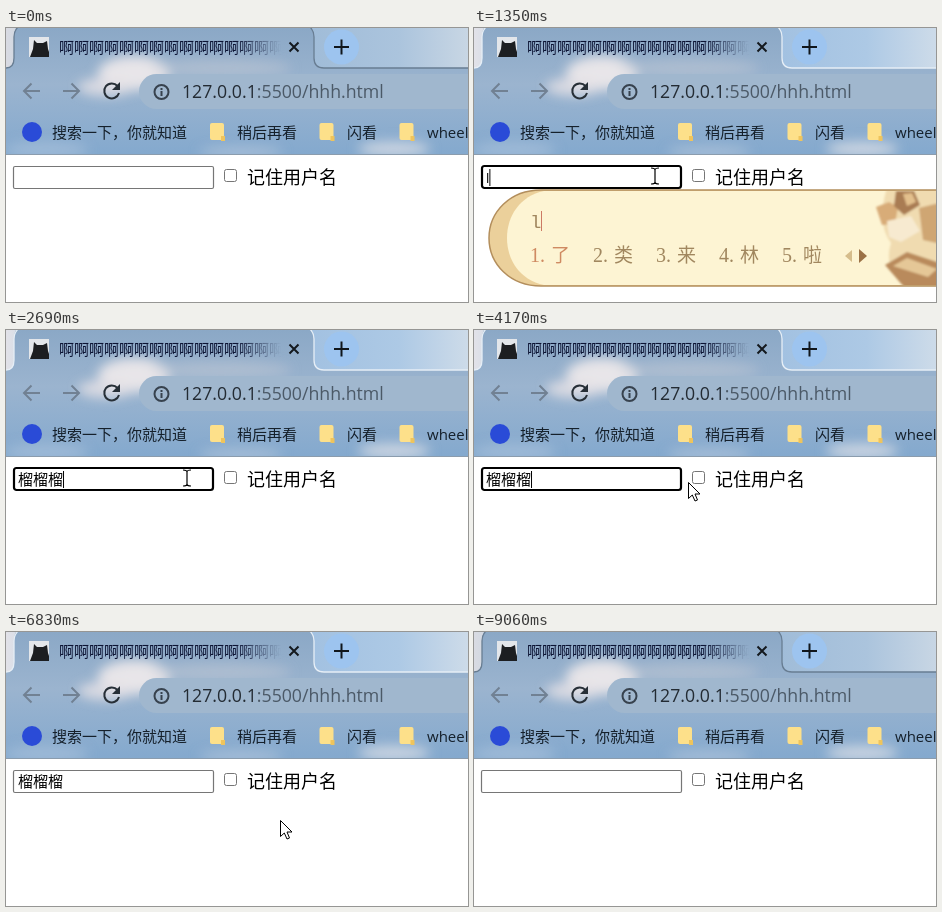
These frames come from a looping animation (462x274 px, 9190 ms). An HTML page:

```html
<!DOCTYPE html>
<html lang="zh">
<head>
<meta charset="utf-8">
<style>
  html, body { margin: 0; width: 100%; height: 100%; overflow: hidden; background: #fff; }
  svg { display: block; width: 462px; height: 274px; }
  text { font: 15px "Open Sans", "Noto Sans CJK SC", "Noto Sans CJK", sans-serif; white-space: pre; }
  .line { fill: none; stroke-width: 2; }
  #panel text { font: 300 20px "Liberation Serif", "Noto Sans CJK SC", "Noto Sans CJK", serif; fill: #a1875f; }
  #panel #pinyin { font: 19px "Liberation Mono", monospace; }
  #panel .word { font-size: 19px; }
  #panel .first { fill: #cf8a62; }
</style>
</head>
<body>
<svg viewBox="0 0 462 274">
  <defs>
    <linearGradient id="sky" x2="0" y2="1">
      <stop offset="0" stop-color="#8ba8c6"/><stop offset=".45" stop-color="#9bb4cf"/><stop offset="1" stop-color="#84a9ce"/>
    </linearGradient>
    <linearGradient id="active">
      <stop offset="0" stop-color="#e2e2e8"/><stop offset=".06" stop-color="#cbd8e6"/>
      <stop offset=".66" stop-color="#a2c1e1"/><stop offset=".85" stop-color="#adc9e5"/><stop offset="1" stop-color="#cddbe9"/>
    </linearGradient>
    <linearGradient id="inactive">
      <stop offset="0" stop-color="#d9dbe2"/><stop offset=".06" stop-color="#c4d2e0"/>
      <stop offset=".66" stop-color="#a0bcd8"/><stop offset=".85" stop-color="#abc4dd"/><stop offset="1" stop-color="#c8d6e4"/>
    </linearGradient>
    <linearGradient id="fade" gradientUnits="userSpaceOnUse" x1="230" x2="275" y1="0" y2="0">
      <stop offset="0" stop-color="#0c1434"/><stop offset="1" stop-color="#0c1434" stop-opacity="0"/>
    </linearGradient>
    <filter id="soft" x="-50%" y="-100%" width="200%" height="300%"><feGaussianBlur stdDeviation="6"/></filter>
    <filter id="blur"><feGaussianBlur stdDeviation="1.200"/></filter>
    <clipPath id="chrome"><path d="M0 0H462V126H0Z"/></clipPath>
    <clipPath id="inside"><path d="M0 163H480V257H0Z"/></clipPath>
    <clipPath id="iconFull"><path d="M23 9h20v20h-20z"/></clipPath>
    <clipPath id="iconRound"><circle cx="33" cy="19" r="8.5"/></clipPath>
    <g id="folder"><path d="M0 2q0-2 2-2h10q2 0 2 2v15H2q-2 0-2-2z" fill="#fde08a"/><path d="M11 13h4v5h-4z" fill="#efc45c"/></g>
  </defs>

  <g clip-path="url(#chrome)">
    <path d="M0 0H462V126H0Z" fill="url(#sky)"/>
    <g filter="url(#soft)">
      <ellipse cx="128" cy="45" rx="36" ry="17" fill="#ece8ea" opacity=".95"/>
      <ellipse cx="100" cy="59" rx="28" ry="9" fill="#e4e1e6" opacity=".85"/>
      <ellipse cx="215" cy="40" rx="70" ry="9" fill="#c3c9d5" opacity=".5"/>
      <ellipse cx="40" cy="122" rx="42" ry="9" fill="#a6bfda" opacity=".7"/>
      <ellipse cx="235" cy="124" rx="42" ry="6" fill="#b4c7dc" opacity=".7"/>
      <ellipse cx="388" cy="121" rx="36" ry="8" fill="#d8dce5" opacity=".8"/>
    </g>
    <path id="strip" d="M0 0H10Q8 3 8 9V30Q8 40 0 40ZM304 0H462V40H318Q308 40 308 30V9Q308 3 304 0Z"/>
    <path id="edge" class="line" style="stroke-width:1.3" d="M0 40Q8 40 8 30V9Q8 3 12-1M304-1Q308 3 308 9V30Q308 40 318 40H462"/>
  </g>
  <path d="M0 126.5H462" stroke="#8b9cad"/>

  <g id="favicon">
    <path d="M23 9h20v20h-20z" fill="#e3e6ea"/>
    <path d="M24 29l3-8 1-9 3 3h6l4-2 1 8 1 3v5z" fill="#1c1e21"/>
  </g>
  <text x="53" y="25" fill="url(#fade)">啊啊啊啊啊啊啊啊啊啊啊啊啊啊啊</text>
  <path class="line" stroke="#14191e" d="M283.500 14.500l9 9m0-9l-9 9"/>
  <circle cx="335.500" cy="19" r="17.500" fill="#9dc4ef"/>
  <path class="line" stroke="#10161c" d="M328 19h15m-7.500-7.500v15"/>

  <g class="line">
    <path stroke="#718193" d="M34 63H18m7.500-7.500L18 63l7.500 7.500M57 63h16m-7.500-7.500L73 63l-7.500 7.500"/>
    <path stroke="#272f37" d="M111.500 58a7.500 7.500 0 1 0 1.500 7"/>
    <path fill="#272f37" d="M114 54v8h-8z"/>
  </g>
  <rect x="133" y="46" width="360" height="35" rx="17.500" fill="#a0b7ce"/>
  <circle class="line" cx="155.500" cy="64" r="7" stroke="#37424e"/>
  <path d="M154.500 60h2v2h-2zm0 3h2v5h-2z" fill="#37424e"/>
  <text x="176" y="70" style="font-size:17.700px" fill="#232b33">127.0.0.1<tspan fill="#4b5967">:5500/hhh.html</tspan></text>

  <circle cx="26" cy="104" r="10" fill="#2a4bd7"/>
  <g fill="#15202b">
    <text x="46" y="110">搜索一下，你就知道</text>
    <text x="231" y="110">稍后再看</text>
    <text x="341" y="110">闪看</text>
    <text x="421" y="110">wheel</text>
  </g>
  <use href="#folder" x="204" y="95"/><use href="#folder" x="313.500" y="95"/><use href="#folder" x="393.500" y="95"/>

  <rect id="field" fill="#fff"/>
  <text id="value" y="154.500"></text>
  <path id="caret" stroke="#000" d="M0 141v17"/>
  <rect id="box" x="218.500" y="141.500" width="12" height="12" rx="2"/>
  <path id="tick" class="line" stroke="#fff" d="M221 147.500l2.700 3 4.700-6"/>
  <text x="241" y="155.500" style="font-size:18px;font-weight:300">记住用户名</text>

  <g id="panel">
    <path d="M480 162H67C36 162 15 184 15 210S36 258 67 258H480Z" fill="#ebd09b" stroke="#b38e5c" stroke-width="1.500"/>
    <path d="M480 163H70C46 168 33 188 33 210S46 252 70 257H480Z" fill="#fdf4d3"/>
    <g clip-path="url(#inside)">
      <g id="books" filter="url(#blur)">
        <path d="M66 160H135V260H84Q62 240 70 215 55 195 66 160Z" fill="#f0dbb0"/>
        <path d="M55 179l13-5 9 5-3 17-13 1z" fill="#d8ac78"/>
        <path d="M75 163h18l6 14-16 10-10-9z" fill="#a97c52"/>
        <path d="M82 166l9-1 4 9-9 4z" fill="#e3c08d"/>
        <path d="M66 193l24-5 9 15-19 11-12-5z" fill="#f7ead0"/>
        <path d="M98 180l32-8v46l-28-6z" fill="#cfa673"/>
        <path d="M64 237l22-13 36 12v24H84z" fill="#b98a5c"/>
        <path d="M72 238l14-8 30 11-9 8z" fill="#e5c797"/>
      </g>
    </g>
    <text id="pinyin" x="56" y="200"></text>
    <path id="panelCaret" stroke="#cc7a64" d="M0 183v20"/>
    <text id="words" y="234"></text>
    <g id="pager"><path d="M32 222v12l-7-6z" fill="#d6bd8c"/><path d="M39 221v14l8-7z" fill="#9b7145"/></g>
  </g>

  <g id="cursor" stroke="#000">
    <path id="arrow" fill="#fff" d="M.500.500V16.500L4.300 13 7 19 9.500 18 7 12H12Z"/>
    <path id="beam" class="line" style="stroke-width:1.200" d="M-4-8q4 0 4 2 0-2 4-2M0-6V6M-4 8q4 0 4-2 0 2 4 2"/>
  </g>
</svg>
<script>
const LOOP = 9190, STEP = 67, BLINK = 530;
const $ = id => document.getElementById(id);
const show = (id, on) => $(id).style.display = on ? "" : "none";
const within = (t, from, to) => t >= from && t < to;
const set = (id, attrs) => { for (const k in attrs) $(id).setAttribute(k, attrs[k]); };

const NAME = "榴榴榴", FOCUS = 750, BLUR = 4370, COMMIT = 2690;
// time, typed letters, candidates
const KEYS = [
  [1280, "l", "了 类 来 林 啦"],
  [1560, "li", "里 力 利 理 立"],
  [1630, "liu", "六 流 留 溜 柳"],
  [1830, "liul", "浏览 流量 流露 流泪 流浪"],
  [2030, "liuliu", "溜溜 六六 榴榴 流流 流浪"],
  [2230, "liuliul", "溜溜了 六六了 留留了 流浪"],
  [2430, "liuliuliu", "榴榴榴 溜溜溜 六六六 流流流"],
  [COMMIT, "", ""],
];
// time, x, y of the pointer
const PATH = [
  [70, 448, 256], [670, 181, 148], [3080, 181, 148], [3480, 337, 171], [3880, 318, 152],
  [4140, 318, 152], [4150, 214, 152], [4350, 222, 148], [4910, 222, 148], [5020, 264, 168],
  [5600, 264, 168], [6030, 235, 156], [6140, 235, 156], [6220, 223, 148], [6520, 223, 148],
  [6760, 274, 188], [7160, 274, 188], [7620, 309, 201], [7830, 309, 201], [8390, 422, 274],
];
const RELOADS = [[5240, 5480], [5700, 5900], [6080, 6230], [7160, 7450], [7850, 8150]];

function pointerAt(t) {
  const next = PATH.findIndex(p => p[0] > t);
  if (next < 1) return PATH[next ? PATH.length - 1 : 0].slice(1);
  const [t0, x0, y0] = PATH[next - 1], [t1, x1, y1] = PATH[next];
  const k = (t - t0) / (t1 - t0), ease = k * k * (3 - 2 * k);
  return [x0 + (x1 - x0) * ease, y0 + (y1 - y0) * ease].map(Math.round);
}

function drawPanel(letters, candidates) {
  show("panel", letters);
  if (!letters) return;
  const spelling = letters.match(/l[^l]*/g).join("'");
  $("pinyin").textContent = spelling;
  const end = 67.5 + (spelling.length - 1) * 11.4;
  set("panelCaret", { transform: `translate(${end})` });
  let x = 56;
  $("words").innerHTML = candidates.split(" ").map((word, i) => {
    const color = i ? "" : "first";
    const item = `<tspan class="${color}" x="${x}">${i + 1}.</tspan><tspan class="word ${color}" x="${x + 21}">${word}</tspan>`;
    x += 44 + 19 * word.length;
    return item;
  }).join("");
  set("pager", { transform: `translate(${x - 25})` });
  set("books", { transform: `translate(${x - 24})` });
}

function draw(t) {
  const active = within(t, FOCUS, 9060), focused = within(t, FOCUS, BLUR);
  set("strip", { fill: `url(#${active ? "active" : "inactive"})` });
  set("edge", { stroke: active ? "#e6eef6" : "#687d92" });
  const loading = RELOADS.some(([a, b]) => within(t, a, b));
  set("favicon", { "clip-path": `url(#${loading ? "iconRound" : "iconFull"})` });

  set("field", focused
    ? { x: 8, y: 138, width: 199, height: 22, rx: 2.5, stroke: "#000", "stroke-width": 2.2 }
    : { x: 7.5, y: 138.5, width: 200, height: 22, rx: 1.5, stroke: "#767676", "stroke-width": 1.2 });

  const [keyTime, letters, candidates] = KEYS.filter(k => k[0] <= t).pop() || [FOCUS, "", ""];
  const value = within(t, COMMIT, 7300) ? NAME : letters;
  $("value").textContent = value;
  set("value", { x: 12, style: `font-size:${letters ? 13.3 : 15}px` });
  show("caret", focused && Math.floor((t - keyTime) / BLINK) % 2 === 0);
  set("caret", { transform: `translate(${12.5 + (value ? $("value").getComputedTextLength() : 0)})` });
  drawPanel(letters, candidates);

  const checked = within(t, BLUR, 6230);
  set("box", { fill: checked ? "#0075ff" : "#fff", stroke: checked ? "#0075ff" : "#767676" });
  show("tick", checked);

  const [x, y] = pointerAt(Math.floor(t / STEP) * STEP);
  const overField = x < 208 && y > 137 && y < 161;
  show("cursor", within(t, 70, 8400));
  show("arrow", !overField);
  show("beam", overField);
  set("cursor", { transform: `translate(${x} ${y})` });
}

const start = performance.now();
function tick() {
  draw((performance.now() - start) % LOOP);
  requestAnimationFrame(tick);
}
tick();
</script>
</body>
</html>
```
